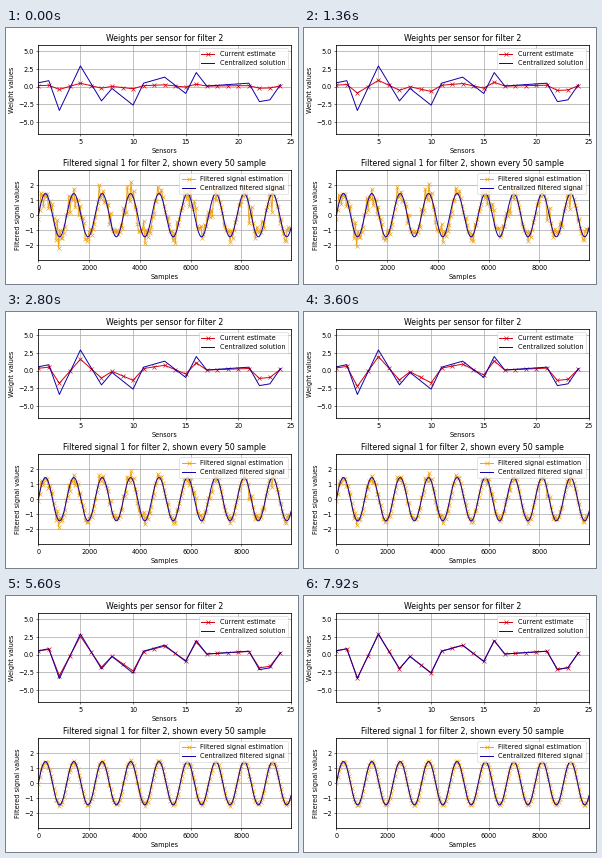
A matplotlib script that plays this animation: 292x256 px, repeating every 8 s.

```python
import numpy as np
import matplotlib.pyplot as plt
from matplotlib.animation import FuncAnimation

WIDTH, HEIGHT, DPI = 292, 256, 47
FRAMES, INTERVAL = 100, 80
RED, BLUE, ORANGE = "#d4000f", "#1000a8", "#eea21a"

plt.rcParams.update({
    "font.family": "DejaVu Sans",
    "axes.linewidth": 1.2,
    "axes.labelpad": 4.8,
    "grid.color": "#a8a8a8",
    "grid.linewidth": 1.1,
    "toolbar": "None",
})

# Turning points of the ideal weights; the rest lie on straight runs between.
TURNS = [(1, 0.55), (2, 0.85), (3, -3.35), (5, 2.93), (7, -2.0), (8, -0.25),
         (10, -2.6), (11, 0.5), (13, 1.35), (15, -0.95), (16, 2.0), (17, 0.1),
         (21, 0.5), (22, -2.1), (23, -1.85), (24, 0.3)]

sensors = np.arange(1, 25)
solution = np.interp(sensors, *zip(*TURNS))
start = 0.14 * solution + 0.08

samples = np.arange(0, 10000, 50)
signal = 1.45 * np.sin(2 * np.pi * samples / 1118)
noise = np.random.default_rng(4).normal(0, 0.41, samples.size)


def remaining_error(seconds):
    return np.exp(-(seconds / 3.7) ** 1.7)


def add_panel(top, bottom, title, xlabel, ylabel, **limits):
    left, right = 32.3, 285
    ax = fig.add_axes([left / WIDTH, 1 - bottom / HEIGHT,
                       (right - left) / WIDTH, (bottom - top) / HEIGHT])
    ax.set(title=title, xlabel=xlabel, ylabel=ylabel, **limits)
    ax.grid(True)
    return ax


def add_curves(ax, x, ideal, color, names):
    estimate, = ax.plot(x, ideal, color=color, marker="x", label=names[0])
    ax.plot(x, ideal, color=BLUE, label=names[1])
    ax.legend(loc="upper right")
    return estimate


fig = plt.figure(figsize=((WIDTH + 0.01) / DPI, (HEIGHT + 0.01) / DPI), dpi=DPI)

weights_ax = add_panel(
    17.2, 106.2, "Weights per sensor for filter 2", "Sensors", "Weight values",
    xlim=(1, 25), ylim=(-6.7, 5.86),
    xticks=range(5, 26, 5), yticks=np.arange(-5, 6, 2.5))
estimate_line = add_curves(weights_ax, sensors, solution, RED,
                           ("Current estimate", "Centralized solution"))

signal_ax = add_panel(
    142.2, 232.2, "Filtered signal 1 for filter 2, shown every 50 sample",
    "Samples", "Filtered signal values",
    xlim=(0, 9950), ylim=(-3, 3),
    xticks=range(0, 9000, 2000), yticks=range(-2, 3))
filtered_line = add_curves(signal_ax, samples, signal, ORANGE,
                           ("Filtered signal estimation",
                            "Centralized filtered signal"))


def update(frame):
    error = remaining_error(frame * INTERVAL / 1000)
    estimate_line.set_ydata(solution + (start - solution) * error)
    filtered_line.set_ydata(signal + noise * error)
    return estimate_line, filtered_line


animation = FuncAnimation(fig, update, frames=FRAMES, interval=INTERVAL,
                          repeat=True)
plt.show()
```
